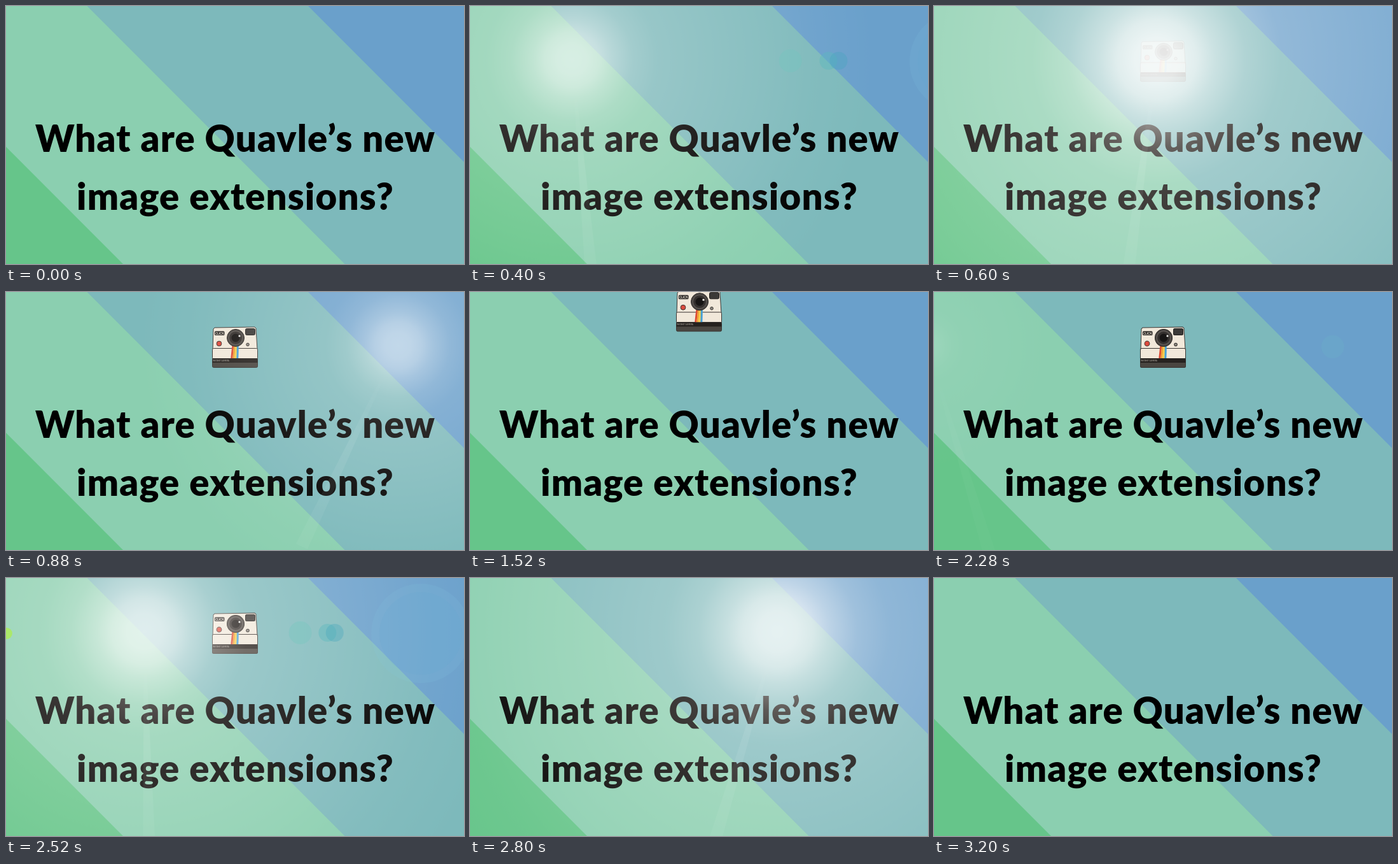
These frames come from a looping animation (720 px wide and 405 px high, 3280 ms). An HTML page with a canvas:

```html
<!DOCTYPE html>
<html lang="en">
<head>
<meta charset="utf-8">
<title>Image extensions</title>
<style>
  html, body { margin: 0; width: 100%; height: 100%; overflow: hidden; }
  canvas { display: block; }
</style>
</head>
<body>
<canvas id="stage" width="720" height="405"></canvas>
<script>
const ctx = document.getElementById('stage').getContext('2d');
const LOOP = 3280, STEP = 40;
const FLARE_IN = 120, FLARE_OUT = 2180, FLARE_MS = 1000;
const JUMP = 1240, LAND = 1840;
const clamp = v => Math.max(0, Math.min(1, v));

function poly(color, points, stroke) {
  ctx.beginPath();
  points.forEach(([x, y]) => ctx.lineTo(x, y));
  ctx.closePath();
  ctx.fillStyle = color;
  ctx.fill();
  if (stroke) outline(stroke);
}

function outline(color, width = 1) {
  ctx.strokeStyle = color;
  ctx.lineWidth = width;
  ctx.stroke();
}

function disc(x, y, r, color, stroke) {
  ctx.beginPath();
  ctx.arc(x, y, r, 0, 7);
  ctx.fillStyle = color;
  ctx.fill();
  if (stroke) outline(stroke);
}

function box(x, y, w, h, r, color, stroke) {
  ctx.beginPath();
  ctx.roundRect(x, y, w, h, r);
  ctx.fillStyle = color;
  ctx.fill();
  if (stroke) outline(stroke);
}

function label(text, x, y, font, color, spacing = '0px') {
  ctx.font = font;
  ctx.letterSpacing = spacing;
  ctx.textAlign = 'center';
  ctx.fillStyle = color;
  ctx.fillText(text, x, y);
}

function background() {
  poly('#7db9bb', [[0, 0], [720, 0], [720, 405], [0, 405]]);
  poly('#6aa0cb', [[475, 0], [720, 0], [720, 245]]);
  poly('#8bcfb0', [[0, 0], [127.5, 0], [532.5, 405], [0, 405]]);
  poly('#66c58a', [[0, 221], [184, 405], [0, 405]]);
}

function title() {
  const font = '900 58px Lato, sans-serif';
  label('What are Quavle’s new', 360.5, 229, font, '#000', '1.2px');
  label('image extensions?', 360.5, 320, font, '#000', '1.2px');
}

function camera() {
  const ink = '#3a3532', cream = '#f1e8da';
  poly(cream, [[328, 56], [391, 55], [393, 57], [395, 90], [325, 90], [326, 58]], ink);
  box(324.5, 88.5, 71, 17, 2, cream, ink);
  box(324.5, 104.5, 71, 14, 2, '#4a4641', ink);
  box(324.5, 104, 71, 7, 0, '#26221f');
  label('INSTANT CAMERA', 338, 109, '3px Lato, sans-serif', '#b5aea5');

  // Rainbow band curving down from the lens
  ['#dc4a35', '#f2a136', '#f3cf4a', '#459fd6'].forEach((color, i) => {
    ctx.beginPath();
    ctx.moveTo(357 + i * 2.4, 84);
    ctx.quadraticCurveTo(356 + i * 2.8, 92, 354.8 + i * 3, 104);
    outline(color, 3);
  });

  disc(361, 72, 13.5, '#4b4744', '#292522');
  disc(361, 72, 10.5, '#34302e', '#625c57');
  disc(361, 72, 6.5, '#171514');
  disc(367, 69, 1.6, '#f4f1ec');
  box(376.5, 57.5, 15, 10, 2, '#3b3937', '#24211f');
  box(328, 61.5, 15.5, 6.5, 1.5, '#24211f');
  label('CLICK', 335.7, 66.6, '700 5px Lato, sans-serif', '#f1e8da');
  disc(335, 81, 3.9, '#dc4a3d', ink);
  disc(380, 82.5, 2.3, '#8d8982', ink);
}

function drawCamera(t, alpha) {
  if (!alpha) return;
  let lift = 0, squash = 0;
  if (t > JUMP && t < LAND) {
    const u = (t - JUMP) / (LAND - JUMP);
    lift = 57 * 4 * u * (1 - u);
  } else if (t >= LAND) {
    const d = t - LAND;
    squash = 1.95 * Math.exp(-d / 60) * Math.sin(d * Math.PI / 80);
  }
  ctx.save();
  ctx.globalAlpha = alpha;
  ctx.translate(360, 119 - lift + 2 * squash);
  ctx.scale(1 + 0.075 * squash, 1 - 0.09 * squash);
  ctx.translate(-360, -119);
  camera();
  ctx.restore();
}

function flare(p) {
  if (p <= 0 || p >= 1) return;
  const power = Math.sin(Math.PI * p) ** 2;
  const fade = clamp(power * 4);
  const x = 360 + 950 * (p - 0.49), y = 84;
  const radius = 150 + 550 * power;
  const peak = (0.33 + 0.55 * power) * fade;

  ctx.save();
  ctx.globalCompositeOperation = 'screen';

  const glow = ctx.createRadialGradient(x, y, 0, x, y, radius);
  [[0, 1], [0.05, 0.97], [0.09, 0.87], [0.13, 0.69], [0.2, 0.45],
   [0.28, 0.31], [0.42, 0.24], [0.62, 0.15], [0.8, 0.06], [1, 0]].forEach(([at, a]) => {
    const warm = 22 * clamp(at * 4);
    glow.addColorStop(at, `rgba(255,${255 - warm * 0.6},${255 - warm},${a * peak})`);
  });
  ctx.fillStyle = glow;
  ctx.fillRect(0, 0, 720, 405);

  // Narrow ray that swings as the light travels
  ctx.translate(x, y);
  ctx.rotate(1.12 * (p - 0.36));
  const ray = ctx.createLinearGradient(0, 50, 0, 350);
  ray.addColorStop(0, 'rgba(255,255,255,0)');
  ray.addColorStop(0.4, `rgba(255,255,255,${0.08 * fade})`);
  ray.addColorStop(1, `rgba(255,255,255,${0.04 * fade})`);
  poly(ray, [[-2, 50], [2, 50], [10, 350], [-10, 350]]);
  ctx.restore();

  // Lens reflections lie on the line through the stage centre
  const ghost = fade * clamp((0.47 - p) / 0.1);
  if (!ghost) return;
  const at = k => 360 + k * (x - 360);
  ctx.save();
  ctx.globalAlpha = ghost;
  disc(at(-2.05), 87, 78, 'rgba(130,200,225,.13)');
  disc(at(-2.05), 87, 65, 'rgba(95,165,200,.12)');
  disc(at(-0.72), 86, 18, 'rgba(110,200,190,.3)');
  disc(at(-1.02), 86, 14, 'rgba(90,185,190,.4)');
  disc(at(-1.1), 86, 14, 'rgba(70,165,190,.35)');
  disc(at(2.52), 87, 9, 'rgba(175,240,70,.7)');
  ctx.restore();
}

function draw(t) {
  const pIn = (t - FLARE_IN) / FLARE_MS, pOut = (t - FLARE_OUT) / FLARE_MS;
  const swap = p => clamp((p - 0.44) / 0.1);
  background();
  title();
  drawCamera(t, swap(pIn) * (1 - swap(pOut)));
  flare(pIn);
  flare(pOut);
}

const start = performance.now();
function tick() {
  const t = (performance.now() - start) % LOOP;
  draw(Math.floor(t / STEP) * STEP);
  requestAnimationFrame(tick);
}
tick();
</script>
</body>
</html>
```
